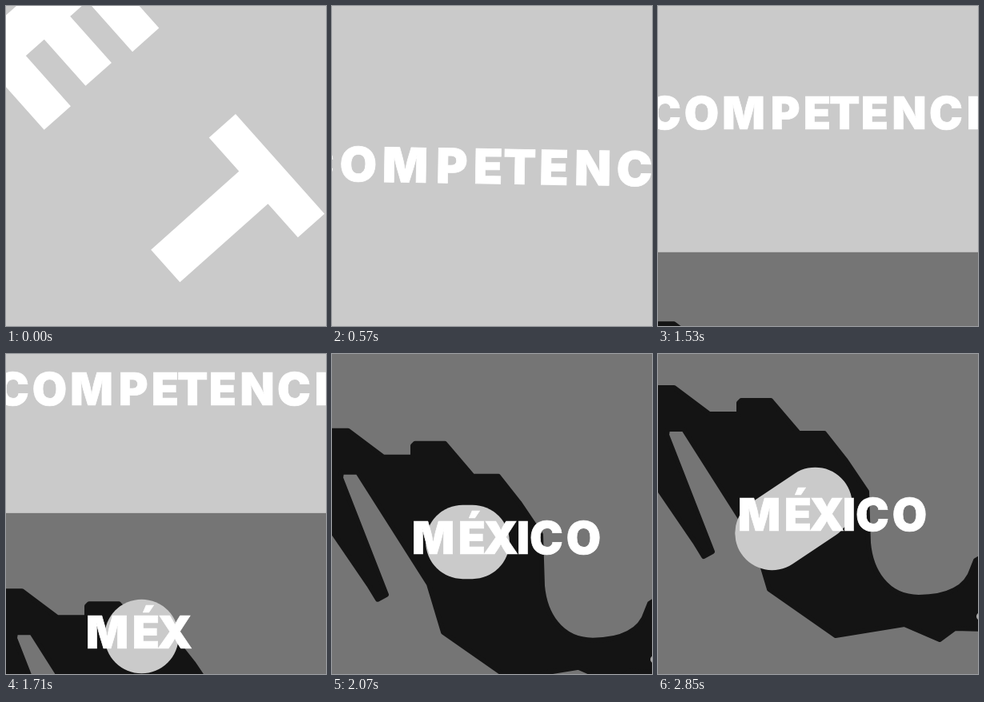
Recreate the animation shown at these times as an HTML page. Size 400 px wide and 400 px high, loop 2.88 s.

```html
<!DOCTYPE html>
<html lang="es">
<head>
<meta charset="utf-8">
<title>Competencia México</title>
<style>
  html, body { margin: 0; width: 100%; height: 100%; overflow: hidden; background: #cacaca; }
  svg { display: block; width: 100%; height: 100%; }
  text { font: 900 56px Inter, "Open Sans", sans-serif; fill: #fff; stroke: #fff; stroke-width: .7; text-anchor: middle; }
</style>
</head>
<body>
<svg viewBox="0 0 400 400">
  <rect width="400" height="400" fill="#cacaca"/>
  <g id="headline"></g>
  <rect id="panel" x="-10" width="420" height="1200" fill="#757575"/>
  <g id="map">
    <path fill="#141414" stroke="#141414" stroke-width="6" stroke-linejoin="round"
      d="M-10 42H20L64 75H101V61L104 58H141L176 99H208L234 132L261 172L263 236
         C266 270 285 304 326 304C362 304 386 292 393 268L397 258L410 250V344
         L371 343L352 357L308 338L222 352L139 294L121 234L32 94H12L11 101
         L68 247L57 253L46 235L-10 153Z"/>
    <circle cx="403" cy="328" r="5" fill="#aaa"/>
  </g>
  <g id="place">
    <line id="pill" stroke="#cacaca" stroke-width="92.5" stroke-linecap="round"/>
  </g>
</svg>
<script>
const LOOP = 2880, STEP = 30, PIVOT = 5;
const byId = id => document.getElementById(id);
const clamp = v => Math.min(1, Math.max(0, v));
const span = (t, from, to) => clamp((t - from) / (to - from));
const smooth = p => p * p * (3 - 2 * p);
const shift = (el, x, y) => el.setAttribute('transform', `translate(${x} ${y})`);

// Ease curve with flat ends and handles at x = a and x = b
function ease(p, a, b) {
  let lo = 0, hi = 1;
  for (let i = 0; i < 24; i++) {
    const u = (lo + hi) / 2, v = 1 - u;
    if (3 * v * v * u * a + 3 * v * u * u * b + u ** 3 < p) lo = u; else hi = u;
  }
  return smooth(lo);
}

const scrollAt = t => ease(span(t, 1088, 2424), .51, .5);

function addLetters(parent, word, centres) {
  return [...word].map((char, i) => {
    const el = document.createElementNS('http://www.w3.org/2000/svg', 'text');
    el.textContent = char;
    parent.append(el);
    return { el, x: centres[i] };
  });
}

const headline = byId('headline'), panel = byId('panel'), map = byId('map');
const place = byId('place'), pill = byId('pill');
const headLetters = addLetters(headline, 'COMPETENCIA',
  [-207, -160.5, -108, -56, -16, 18.3, 56, 99, 145, 179, 214]);
const placeLetters = addLetters(place, 'MÉXICO', [126.5, 175, 211, 239, 268, 314.5]);

function drawHeadline(t) {
  const rest = (1 - span(t, 0, 781)) ** 3;
  const tracking = 27 * rest + 3 * (1 - span(t, 0, 1500));
  const y = 200.5 - 3 * rest - 430 * scrollAt(t - 40);
  headline.setAttribute('transform',
    `translate(215 ${y}) rotate(${48.3 * rest}) scale(${1 + 3.63 * rest})`);
  headLetters.forEach(({ el, x }, i) => shift(el, x + (i - PIVOT) * tracking, 20.5));
}

function drawPlace(t) {
  const drop = 76 * Math.exp((1860 - t) / 225);
  shift(place, 0, drop);
  placeLetters.forEach(({ el, x }, i) => {
    const start = 1511 + 60 * i;
    shift(el, x, 220 + 100 * (1 - span(t, start, start + 75)));
  });
  const half = 32.4 * smooth(span(t, 1840, 2670));
  const angle = -33.7 * smooth(span(t, 2100, 2850)) * Math.PI / 180;
  const dx = half * Math.cos(angle), dy = half * Math.sin(angle);
  // A tiny extra length keeps the round caps visible while the line is a dot
  const ends = { x1: 169.5 - dx, y1: 205 - dy, x2: 169.51 + dx, y2: 205 + dy };
  for (const key in ends) pill.setAttribute(key, ends[key]);
}

function draw(t) {
  const scroll = scrollAt(t);
  drawHeadline(t);
  panel.setAttribute('y', 400 - 475 * scroll);
  shift(map, 0, 441 * (1 - scroll));
  drawPlace(t);
}

const began = performance.now();
function tick() {
  const t = (performance.now() - began) % LOOP;
  draw(Math.floor(t / STEP) * STEP);
  requestAnimationFrame(tick);
}
tick();
</script>
</body>
</html>
```
